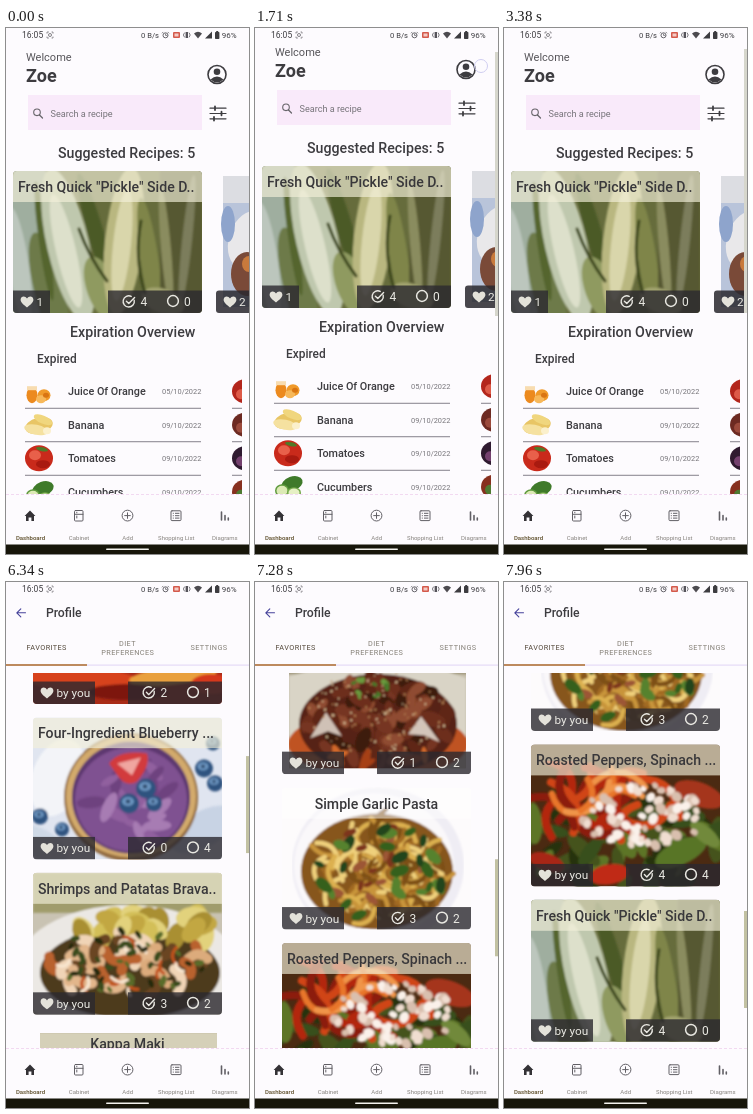
An HTML page that plays this animation: 243 by 526 pixels, repeating every 8 s.

```html
<!DOCTYPE html>
<html lang="en">
<head>
<meta charset="utf-8">
<title>Recipe app</title>
<style>
@property --dash { syntax: "<number>"; inherits: true; initial-value: 0; }
@property --list { syntax: "<number>"; inherits: true; initial-value: 0; }
html, body { margin: 0; width: 100%; height: 100%; overflow: hidden; background: #fdfbfe; }
svg { display: block; font-family: Roboto, "Open Sans", sans-serif; animation: dash 8s infinite, list 8s infinite; }
.m { font-weight: 500; }
.b { font-weight: 700; }
.tab { font-size: 7.3px; letter-spacing: .4px; text-anchor: middle; }
.line { fill: none; stroke-linecap: round; stroke-linejoin: round; }
#dashBody { transform: translateY(calc(var(--dash) * -1px)); }
#dashThumb { transform: translateY(calc(var(--dash) * .6px)); animation: thumb 8s infinite; }
#listBody { transform: translateY(calc(var(--list) * -1px)); }
#listThumb { transform: translateY(calc(var(--list) * .2605px)); }
#profile { animation: page 8s step-end infinite; }
#tapTop { opacity: 0; animation: tapTop 8s infinite; }
#tapList { opacity: 0; animation: tapList 8s infinite; }

@keyframes dash {
  0%, .5% { --dash: 0; animation-timing-function: ease-out; }
  5.375%, 10.75% { --dash: 16; animation-timing-function: ease-in-out; }
  21.1%, 22% { --dash: 5; animation-timing-function: ease-in-out; }
  30% { --dash: 14; animation-timing-function: ease-in-out; }
  38.5%, 40.6% { --dash: 2; animation-timing-function: ease-out; }
  42.25%, 100% { --dash: 0; }
}
@keyframes thumb { 0%, .5% { opacity: 0; } 1%, 100% { opacity: 1; } }
@keyframes page { 0% { opacity: 0; } 79.25%, 100% { opacity: 1; } }
@keyframes list {
  0%, 79.25% { --list: 0; animation-timing-function: cubic-bezier(.3, .5, .65, .95); }
  85.125% { --list: 104; animation-timing-function: cubic-bezier(.35, .15, .7, .85); }
  91% { --list: 396; animation-timing-function: cubic-bezier(.3, .45, .65, .95); }
  99.5%, 100% { --list: 595; }
}
@keyframes tapTop { 0%, 20.5% { opacity: 0; } 21%, 21.9% { opacity: 1; } 22.5%, 100% { opacity: 0; } }
@keyframes tapList {
  0%, 84.4% { opacity: 0; transform: none; }
  84.9%, 85.4% { opacity: .75; transform: none; }
  87%, 100% { opacity: 0; transform: translateY(-80px); }
}
</style>
</head>
<body>
<svg id="stage" width="243" height="526" viewBox="0 0 243 526"></svg>
<script>
const ink = '#3d3c40';
const text = (x, y, size, s, cls = '', fill = ink, more = '') =>
  `<text x="${x}" y="${y}" font-size="${size}" class="${cls}" fill="${fill}" ${more}>${s}</text>`;
const rect = (x, y, w, h, fill, more = '') =>
  `<rect x="${x}" y="${y}" width="${w}" height="${h}" fill="${fill}" ${more}/>`;
const oval = (x, y, rx, ry, fill, turn = 0) =>
  `<ellipse cx="${x}" cy="${y}" rx="${rx}" ry="${ry}" fill="${fill}" transform="rotate(${turn} ${x} ${y})"/>`;
const shape = (d, fill) => `<path d="${d}" fill="${fill}"/>`;
const line = (d, color = ink, w = 1.2) => `<path class="line" d="${d}" stroke="${color}" stroke-width="${w}"/>`;
const ring = (x, y, r, color, w = 1.2) =>
  `<circle cx="${x}" cy="${y}" r="${r}" fill="none" stroke="${color}" stroke-width="${w}"/>`;
const at = (x, y, body, more = '') => `<g transform="translate(${x} ${y})" ${more}>${body}</g>`;

function random(seed) {
  return () => (seed = (seed * 16807) % 2147483647) / 2147483647;
}

// n ovals strewn over an elliptic area
function strew(seed, n, x, y, w, h, rx, ry, colors) {
  const r = random(seed * 7919);
  let out = '';
  for (let i = 0; i < n; i++) {
    const a = r() * 6.283, d = Math.sqrt(r()), k = .65 + r() * .6;
    out += oval((x + Math.cos(a) * d * w).toFixed(1), (y + Math.sin(a) * d * h).toFixed(1),
      (rx * k).toFixed(1), (ry * k).toFixed(1), colors[i % colors.length], Math.round(r() * 180));
  }
  return out;
}

// n bent strokes strewn over an elliptic area
function strands(seed, n, x, y, w, h, size, width, colors) {
  const r = random(seed * 7919);
  let out = '';
  for (let i = 0; i < n; i++) {
    const a = r() * 6.283, d = Math.sqrt(r()), s = size * (.6 + r() * .8), t = r() * 6.283;
    const px = x + Math.cos(a) * d * w, py = y + Math.sin(a) * d * h;
    const dx = Math.cos(t) * s, dy = Math.sin(t) * s;
    out += line(`M${px - dx} ${py - dy}Q${px + dy} ${py - dx} ${px + dx} ${py + dy}`, colors[i % colors.length], width);
  }
  return out;
}

const berry = (x, y, r) => oval(x, y, r, r, '#2f527f') + oval(x - 1, y - 2, r * .6, r * .45, '#6d97c2') +
  oval(x - 1, y - 2, r * .25, r * .2, '#2c4468');

const scenes = {
  pickle: ['#666c3c',
    oval(12, 76, 26, 96, '#9fae9f', 4) + oval(6, 96, 10, 60, '#bcc6bd', -8) +
    oval(36, 118, 15, 58, '#6d7a48', -14) + oval(31, 70, 5, 60, '#54652f', -8) +
    oval(55, 74, 21, 78, '#bfc8ae', -13) + oval(53, 80, 10, 58, '#dde0cb', -13) +
    oval(84, 66, 8, 66, '#4b5a28', -16) + oval(89, 118, 15, 34, '#8f9a60', -20) +
    oval(111, 70, 19, 74, '#b9b780', 6) + oval(109, 74, 9, 56, '#d9d6ab', 6) +
    oval(137, 92, 9, 66, '#7f8548', -8) + rect(147, 0, 42, 142, '#575933') +
    oval(153, 78, 5, 62, '#8a8c5e', -5) + oval(174, 70, 5, 66, '#7b7d5b', 6) + oval(150, 130, 22, 12, '#a3a46f', 20) +
    line('M66 58Q76 86 94 110M128 50Q121 86 132 122', '#3d471d', 3)],
  red: ['#a92b17',
    oval(50, 118, 60, 14, '#d7421e', 5) + oval(140, 114, 44, 9, '#e9a03c', -6) + oval(95, 130, 40, 8, '#7d1810') +
    oval(178, 122, 20, 10, '#d5381d')],
  berry: ['#e0e5f0',
    oval(25, 60, 26, 40, '#f3f4f8', 20) + oval(170, 112, 36, 18, '#c8d3e4', -30) + oval(8, 126, 30, 14, '#cfd9e6', 30) +
    oval(98, 80, 67, 64, '#8f683c') + oval(98, 79, 65, 61, '#d3aa6c') + oval(98, 80, 59, 56, '#5d3870') +
    oval(98, 82, 56, 52, '#7f5191') +
    strew(3, 22, 98, 84, 42, 38, 13, 5, ['#91609f', '#6e437f', '#a77bb3']) +
    shape('M76 46Q86 32 114 36Q118 48 104 64Q94 70 86 60Z', '#d23a3c') + shape('M84 46L108 40L99 58Z', '#f0a6a0') +
    berry(113, 71, 10) + berry(96, 86, 10) + berry(121, 86, 8) + berry(171, 51, 9) + berry(182, 66, 8) +
    berry(7, 99, 8) + berry(29, 112, 7) + berry(180, 26, 7)],
  shrimp: ['#c9c3b3',
    rect(0, 0, 189, 40, '#a09c6c') + oval(95, 100, 114, 68, '#ebe8e4') + oval(97, 100, 90, 46, '#4d3a1c') +
    strew(5, 24, 108, 54, 72, 13, 17, 11, ['#a98f33', '#d3bf58', '#c2a743', '#e2d27c']) +
    strands(8, 34, 94, 92, 76, 26, 10, 10, ['#e2b68b', '#6a4522', '#f0d4b6', '#b9622f', '#dcab7c']) +
    strands(61, 14, 94, 94, 78, 26, 7, 3, ['#f8e6d0', '#c3531f']) +
    strew(11, 44, 96, 88, 78, 32, 4.5, 2.5, ['#3b4b1b', '#5a6c2a', '#262a10'])],
  kappa: ['#c5beab',
    rect(0, 0, 189, 42, '#9d9478') + shape('M7 44L60 30H140L184 46V142H7Z', '#d9d4c6') +
    oval(96, 112, 90, 34, '#bf5220') + oval(96, 92, 79, 50, '#562413') +
    strew(13, 80, 96, 86, 72, 42, 11, 6, ['#763521', '#3d1a0e', '#8f4b30', '#5f2816', '#6d2f1c']) +
    shape('M28 106L44 80L60 104L46 99Z', '#cfc1b6') + shape('M126 102L139 84L158 110L142 103Z', '#d3c5ba') +
    strew(17, 120, 96, 80, 70, 42, 1.2, .8, ['#e0c9a0', '#bd8c5c']) +
    strew(19, 10, 88, 58, 24, 12, 4, 2.5, ['#487a2b', '#6a9a3d']) +
    strew(23, 9, 96, 128, 76, 8, 12, 4, ['#a63f17', '#d2692a'])],
  pasta: ['#fdfbfc',
    oval(96, 78, 86, 78, '#efedf4') + oval(92, 78, 80, 72, '#faf8fa') + oval(95, 84, 76, 58, '#87571f') +
    strands(29, 95, 95, 84, 64, 48, 15, 4.6, ['#dcb04f', '#a26a23', '#efd07c', '#c8943a', '#7d5019']) +
    strew(31, 16, 94, 78, 60, 44, 7, 3.5, ['#7d351d', '#9c5636']) +
    strew(37, 24, 95, 82, 68, 48, 8, 4.5, ['#35601f', '#56822f', '#21451a'])],
  roast: ['#4b2a12',
    strew(41, 46, 95, 96, 100, 50, 20, 8, ['#39501a', '#26330f', '#5d7428', '#44521c']) +
    strands(43, 20, 62, 58, 70, 28, 22, 8, ['#b3270f', '#8c1c0c', '#d04518']) +
    strands(71, 7, 70, 50, 40, 14, 22, 6, ['#e8762a', '#f0954a']) +
    oval(168, 50, 26, 12, '#a5341a', 20) + oval(78, 130, 20, 10, '#c02c18', -10) + oval(16, 118, 18, 9, '#a82713', 20) +
    oval(150, 108, 28, 12, '#587427', -25) + oval(174, 90, 18, 8, '#71893a', 40) +
    strew(53, 70, 112, 70, 62, 32, 5, 4, ['#f0ddd0', '#d9bfae', '#faf1ea'])]
};

const heart = (x, y) => at(x, y,
  shape('M0 5.5C-3 3-6.4.6-6.4-2.2C-6.4-6-1.8-6.8 0-3.4C1.8-6.8 6.4-6 6.4-2.2C6.4.6 3 3 0 5.5Z', '#e4e2da'));

// narrow: the picture sits inset, the badges do not
function card(x, y, scene, title, by, done, todo, narrow) {
  const [base, art] = scenes[scene];
  const pale = '#e9e8e2', bar = 'rgba(43,41,47,.8)';
  const centred = narrow || scene === 'pasta';
  const band = scene === 'pasta' ? 'rgba(255,255,255,.5)' : 'rgba(243,240,218,.66)';
  const badge = by.length > 1 ? 62 : 37;
  return at(x, y,
    `<g clip-path="url(#${narrow ? 'inset' : 'full'})">${rect(0, 0, 189, 142, base)}<g filter="url(#soft)">${art}</g>` +
    rect(0, 0, 189, 31, band) + '</g>' +
    `<g clip-path="url(#full)">${rect(0, 119.5, badge, 22.5, bar)}${rect(95, 119.5, 94, 22.5, bar)}</g>` +
    text(centred ? 94.5 : 5, 21, 14.1, title, 'm', '#39383b', centred ? 'text-anchor="middle"' : '') +
    heart(14, 131) + text(23.5, 135, 11.8, by, '', pale) +
    line('M121.2 129.3A5.6 5.6 0 1 1 118.2 125.4M113.4 130.2L115.8 132.6L121.6 126.4', pale, 1.4) +
    text(127.5, 135, 12, done, '', pale) + ring(160, 130, 5.4, pale, 1.5) + text(171, 135, 12, todo, '', pale));
}

const foods = [
  oval(-7, 4, 5.5, 8, '#ec8a1f') + rect(-12, -5, 10, 4, '#f8dcb0') + oval(5, 4, 6.5, 6, '#f09a2a') +
    oval(2, 8, 5, 4, '#f7b85a') + oval(7, 4, 3, 2.5, '#d97512'),
  oval(0, 1, 14, 8, '#e8c565', -14) + oval(-3, 5, 12, 5, '#f5e1a0', 12) + oval(4, -5, 10, 4, '#f0d67e', 24) +
    oval(8, 6, 4, 3.5, '#fbf0cc'),
  oval(0, 0, 14, 13, '#c92a1b') + oval(-4, -3, 6, 5, '#e8604a') + oval(3, -9, 6, 2, '#4f7a28', 12) + oval(4, 6, 7, 4, '#a91a10'),
  oval(4, -3, 11, 7, '#3f7a2a', -20) + oval(-6, 4, 7, 6.5, '#5f9a3e') + oval(-6, 4, 5.5, 5, '#dceab5') +
    oval(6, 6, 7, 5.5, '#74a94a') + oval(6, 6, 5.5, 4.2, '#e6f0c4')
];
const nextFoods = [['#b3261c', '#dd5a48'], ['#6d2a22', '#9b4a3c'], ['#2f1a30', '#74406e'], ['#87301f', '#4f7a32']];

function foodList() {
  const rows = [['Juice Of Orange', '05/10/2022'], ['Banana', '09/10/2022'], ['Tomatoes', '09/10/2022'], ['Cucumbers', '09/10/2022']];
  return rows.map(([name, date], i) => {
    const [a, b] = nextFoods[i];
    const rule = rect(19, 16.6, 176, .9, '#77727f') + rect(226, 16.6, 12, .9, '#77727f');
    return at(0, 363.2 + i * 33.5, at(33, 0, foods[i]) + text(62, 3.8, 10.8, name, 'm') +
      text(156, 2.8, 7.4, date, '', '#77757a') + rule + oval(239, 0, 13, 12, a) + oval(235, 3, 5, 5, b));
  }).join('');
}

function dashboard() {
  const person = ring(211, 46.5, 9, ink, 1.6) + oval(211, 43.7, 3.3, 3.3, ink) +
    shape('M204.5 51.6Q211 45.4 217.5 51.6Q211 57.6 204.5 51.6Z', ink);
  const filter = line('M204 80.2H220M204 85.5H220M204 90.8H220', ink, 1.2) +
    line('M209 78.4V82M215.5 83.7V87.3M208 89V92.6', ink, 1.8);
  return '<g clip-path="url(#dashView)"><g id="dashBody">' +
    text(20, 33, 11, 'Welcome', '', '#57555a') + text(20, 54, 18, 'Zoe', 'b') + person +
    rect(22, 67, 174, 35, '#f9eafa') + ring(31, 84.3, 3.3, '#67656a', 1.1) + line('M33.5 87L36.5 90', '#67656a', 1.2) +
    text(44.5, 88.6, 9.1, 'Search a recipe', '', '#77747a') + filter +
    text(52, 129.5, 14.2, 'Suggested Recipes: 5', 'm') +
    card(7, 143, 'pickle', 'Fresh Quick "Pickle" Side D..', '1', 4, 0) +
    nextCard() + text(64, 308.5, 14.2, 'Expiration Overview', 'm') + text(31, 335, 11.9, 'Expired', 'm') +
    `<g clip-path="url(#rows)">${foodList()}</g></g></g>` +
    rect(240, 21, 3, 264, '#d6d6cc', 'id="dashThumb"');
}

function nextCard() {
  return rect(217, 148, 26, 131, '#b9c4da') + rect(217, 148, 26, 27, '#dcdde2') +
    oval(243, 212, 20, 30, '#e9e8ea', 18) + oval(241, 246, 16, 22, '#7a4a38') + oval(243, 236, 7, 8, '#c87a3c') +
    oval(222, 196, 7, 18, '#8ea4cc') + rect(210, 262.5, 37, 22.5, 'rgba(43,41,47,.86)', 'rx="3"') +
    heart(224, 274) + text(233, 278, 11.8, '2', '', '#e9e8e2');
}

function profile() {
  const list = [
    ['red', '', 2, 1], ['berry', 'Four-Ingredient Blueberry ...', 0, 4], ['shrimp', 'Shrimps and Patatas Brava..', 3, 2],
    ['kappa', 'Kappa Maki', 1, 2], ['pasta', 'Simple Garlic Pasta', 3, 2],
    ['roast', 'Roasted Peppers, Spinach ...', 4, 4], ['pickle', 'Fresh Quick "Pickle" Side D..', 4, 0]];
  const cards = list.map(([scene, title, done, todo], i) =>
    card(27, -19.6 + i * 155.4, scene, title, 'by you', done, todo, scene === 'kappa')).join('');
  const dim = '#858077';
  return '<g id="profile">' + rect(0, 15, 243, 452, '#fdfbfe') +
    line('M19.5 30.8H11M14.8 26.8L10.8 30.8L14.8 34.8', '#45419a', 1.1) + text(40, 35.3, 12.2, 'Profile', 'm') +
    text(40.7, 68.4, '7.3', 'FAVORITES', 'tab', '#54483a') + text(121.5, 64, '7.3', 'DIET', 'tab', dim) +
    text(121.8, 72.6, '7.3', 'PREFERENCES', 'tab', dim) + text(203, 68.4, '7.3', 'SETTINGS', 'tab', dim) +
    rect(81, 82.5, 162, 1.2, '#e6dbf8') + rect(0, 82, 81, 2, '#bd8a5e') +
    `<g clip-path="url(#listView)"><g id="listBody">${cards}</g></g>` +
    rect(240, 174, 3, 97, '#c2c1a2', 'id="listThumb"') +
    '<circle id="tapList" cx="53" cy="409" r="6" fill="rgba(255,255,255,.5)" stroke="#e5dfe2"/></g>';
}

function statusBar() {
  return rect(0, 0, 243, 15, '#fdfbfe') + text(16, 10.4, 8.5, '16:05') +
    line('M41 5.2V4H42.5M46 4H47V5.2M47 9V10H46M42.5 10H41V9', '#77747a', .8) + ring(44, 7, 1.5, '#77747a', .9) +
    text(135, 10, 7.6, '0 B/s') + ring(159.5, 7.3, 2.5, '#55535a', .9) + line('M157 4.2L156.2 5M162 4.2L162.8 5M159.5 6V7.4H161', '#55535a', .7) +
    rect(167, 4, 7, 6, '#d45a4c', 'rx="1"') + rect(168.5, 5.5, 4, 3, '#f4cbc5') +
    line('M178.4 5L177.4 7L178.4 9M183.2 5L184.2 7L183.2 9', '#55535a', .8) + rect(179.6, 4, 2.4, 6, '#55535a') +
    shape('M188 5.4Q192 2 196 5.4L192 10.4Z', '#4d4b50') + shape('M199 10.4L206 3.4V10.4Z', '#3d3c40') +
    rect(209, 4, 4.4, 7, ink, 'rx=".7"') + rect(210.2, 3, 2, 1.2, ink) + text(215.8, 10.4, 8, '96%');
}

function navBar() {
  const c = '#615f65';
  const icons = [
    shape('M18.6 488L24 482.6L29.4 488H28V493H25.4V489.5H22.6V493H20V488Z', '#343236'),
    `<rect class="line" x="68.5" y="482.5" width="8.5" height="10.5" rx="1" stroke="${c}"/>` + line('M68.5 486.3H77M70.8 484.2V484.8M70.8 488V490', c, 1),
    ring(121.5, 487.6, 5.4, c, 1) + line('M118.7 487.6H124.3M121.5 484.8V490.4', c, 1),
    `<rect class="line" x="165" y="482.8" width="10" height="9.8" rx="1" stroke="${c}"/>` +
      line('M167.2 485.3H167.4M169.4 485.3H173M167.2 487.7H167.4M169.4 487.7H173M167.2 490.1H167.4M169.4 490.1H173', c, 1),
    line('M215.5 492V484M219 492V487.5M222.3 492V490', c, 1.6)
  ].join('');
  const labels = ['Dashboard', 'Cabinet', 'Add', 'Shopping List', 'Diagrams'].map((s, i) =>
    text(24.5 + i * 48.6, 511.8, 6, s, i ? '' : 'm', i ? '#85817c' : '#5a4a25', 'text-anchor="middle"')).join('');
  return rect(0, 466, 243, 51, '#fdfbfe') +
    '<path d="M0 466.5H243" stroke="#f2d9f1" stroke-dasharray="3 2"/>' + icons + labels +
    rect(0, 516.5, 243, 9.5, '#17160a') + rect(100, 520.4, 43, 1.6, '#f4f3ee', 'rx=".8"');
}

const clip = (id, x, y, w, h, r = 0) => `<clipPath id="${id}">${rect(x, y, w, h, '#000', `rx="${r}"`)}</clipPath>`;

document.getElementById('stage').innerHTML =
  '<defs>' + clip('full', 0, 0, 189, 142, 4) + clip('inset', 7, 5, 177, 131) + clip('dashView', 0, 15, 243, 452) +
  clip('rows', 0, 340, 236, 200) + clip('listView', 0, 91, 243, 375) +
  '<filter id="soft" x="0" y="0" width="1" height="1"><feGaussianBlur stdDeviation=".8"/></filter></defs>' +
  rect(0, 0, 243, 526, '#fdfbfe') + dashboard() +
  '<circle id="tapTop" cx="226" cy="38" r="6.5" fill="none" stroke="#cfcdf0"/>' +
  profile() + statusBar() + navBar();
</script>
</body>
</html>
```
